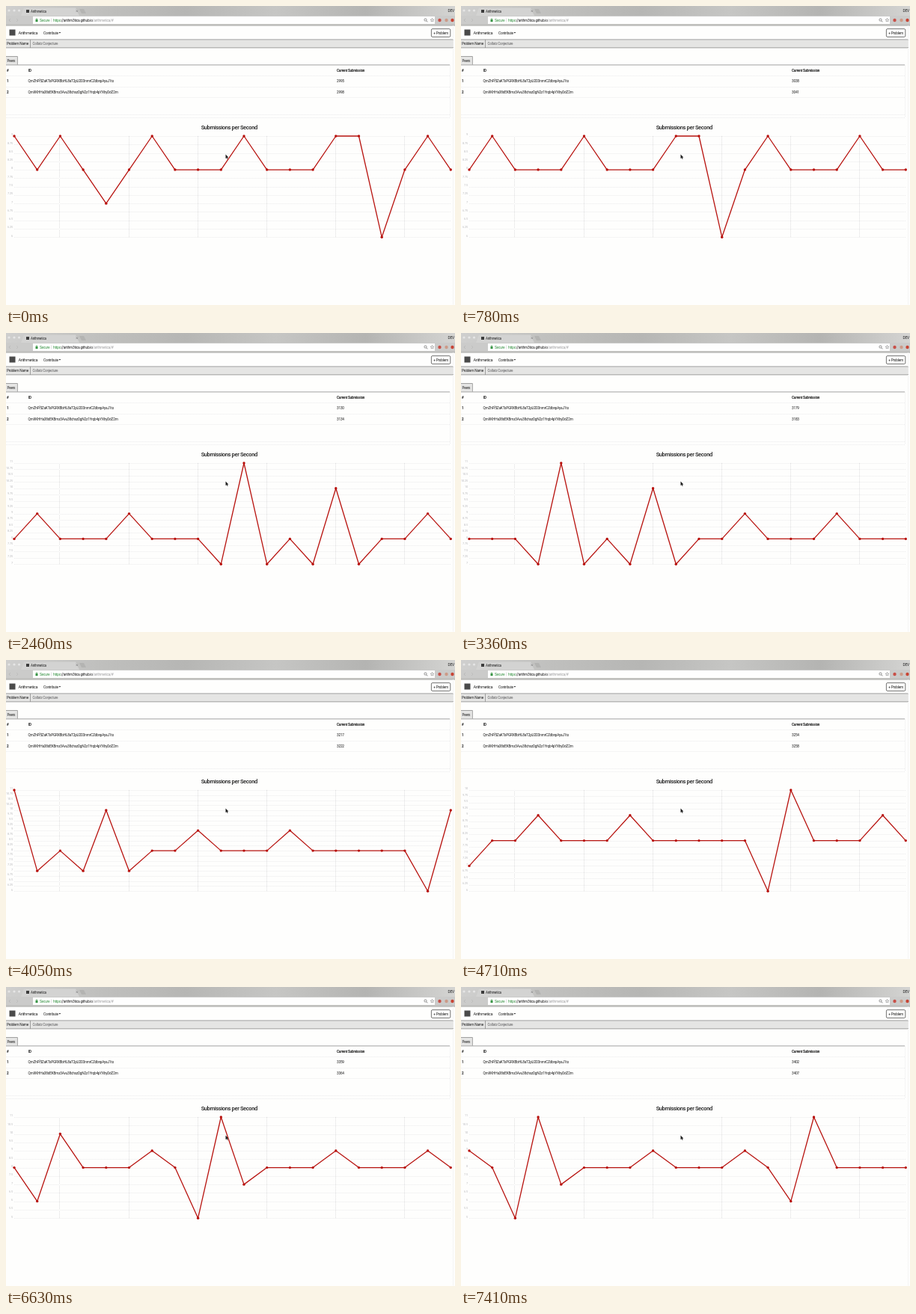
These frames come from a looping animation (600x400 px, 7440 ms). An HTML page with a canvas:

```html
<!DOCTYPE html>
<html lang="en">
<head>
<meta charset="utf-8">
<title>Arithmetica</title>
<style>
  html, body { margin: 0; width: 100%; height: 100%; overflow: hidden; background: #fefefd; }
  canvas { display: block; width: 600px; height: 400px; }
</style>
</head>
<body>
<canvas id="stage" width="600" height="400"></canvas>
<script>
const ctx = document.getElementById('stage').getContext('2d');
const LOOP = 7440, TICK = 30, SHIFT = 150, LEAD = 90;
const FONT = 'Roboto, "Liberation Sans", sans-serif';
const INK = '#1c1c1c', GREY = '#e5e5e4', RULE = '#8c8c8c', FAINT = '#ebebec';

const PEERS = [
  { id: 'QmZhFf5ZaKTsPGRXBbHL8aT2pU2D3nmrCZdbnpAyaJ1ts', from: 2995, perSecond: 54.9 },
  { id: 'QmXKHHa38dEKBmz3Avu38chszDgN2z1Yrqb4pYXhyDdZ2m', from: 2998, perSecond: 55.2 }
];
const PLOT = { left: 11, right: 594.3, top: 174, bottom: 309.2 };

// Submissions per second hover around BASE; the chart shows a window of COUNT.
const BASE = 8, COUNT = 20;
// Stalls and the bursts that follow them, keyed by their first second.
const STALLS = {
  0: [1], 4: [-1], 15: [1, -2], 26: [-1, 3, -1], 30: [-1, 2, -1],
  45: [-2, 2], 52: [-3, 3, -1], 64: [-2, 3, 0]
};

// One extra submission every fourth second, a second late for a while.
function rate(i) {
  for (const back of [0, 1, 2]) {
    const value = STALLS[i - back]?.[back];
    if (value !== undefined) return value;
  }
  const late = i > 25 && i < 43;
  return i % 4 === (late ? 3 : 2) ? 1 : 0;
}

function rect(x, y, w, h, fill) {
  ctx.fillStyle = fill;
  ctx.fillRect(x, y, w, h);
}

function disc(x, y, r, fill) {
  ctx.fillStyle = fill;
  ctx.beginPath();
  ctx.arc(x, y, r, 0, Math.PI * 2);
  ctx.fill();
}

function path(points, color, width = 1) {
  ctx.strokeStyle = color;
  ctx.lineWidth = width;
  ctx.beginPath();
  points.forEach(([x, y]) => ctx.lineTo(x, y));
  ctx.stroke();
}

function shape(points, fill) {
  ctx.fillStyle = fill;
  ctx.beginPath();
  points.forEach(([x, y]) => ctx.lineTo(x, y));
  ctx.fill();
}

function dashed(points, color = FAINT) {
  ctx.setLineDash([1, 1]);
  path(points, color);
  ctx.setLineDash([]);
}

function roundBox(x, y, w, h, r, color) {
  ctx.strokeStyle = color;
  ctx.lineWidth = 0.8;
  ctx.beginPath();
  ctx.roundRect(x, y, w, h, r);
  ctx.stroke();
}

// Returns the x where the text ends.
function text(str, x, y, size, { color = INK, weight = 400, align = 'left' } = {}) {
  ctx.font = `${weight} ${size}px ${FONT}`;
  ctx.letterSpacing = `${-0.05 * size}px`;
  ctx.fillStyle = color;
  ctx.textAlign = align;
  ctx.fillText(str, x, y);
  return x + ctx.measureText(str).width;
}

function drawBrowser() {
  const bar = ctx.createLinearGradient(0, 0, 600, 0);
  ['#cfcfce', '#c0c0be', '#b6b6b4', '#c6c6c4', '#b4b4b2', '#d4d4d2']
    .forEach((color, i, all) => bar.addColorStop(i / (all.length - 1), color));
  rect(0, 0, 600, 13, bar);
  [4, 11, 17.5].forEach(x => disc(x, 6, 1.6, '#e6e6e6'));

  shape([[20, 13], [24, 2.5], [93, 2.5], [98, 13]], '#d3d3d2');
  shape([[98, 4], [104, 4], [107, 10], [101, 10]], '#b4b4b2');
  rect(27, 5, 4, 4, '#3c3c3c');
  text('Arithmetica', 33, 8.8, 4.5);
  path([[93.5, 5.5], [96, 8]], '#77777a', 0.6);
  path([[96, 5.5], [93.5, 8]], '#77777a', 0.6);
  text('DEV', 590.5, 7.8, 4.8);

  rect(0, 13, 600, 13.5, '#cbcbca');
  rect(36, 14, 537, 10, '#fefefe');
  path([[6, 17], [4, 19], [6, 21]], '#b2b2b2', 0.7);
  path([[14, 17], [16, 19], [14, 21]], '#b8b8b8', 0.7);

  const green = { color: '#2f8f3c' };
  rect(39.5, 18.5, 3, 2.6, green.color);
  roundBox(40.2, 17, 1.6, 2, 0.6, green.color);
  text('Secure', 45, 20.8, 4.8, green);
  rect(60.5, 16.5, 0.6, 5, '#c8c8c8');
  let x = text('https', 63, 20.8, 4.8, green);
  x = text('://arithm3tica.github.io', x, 20.8, 4.8);
  text('/arithmetica/#', x, 20.8, 4.8, { color: '#a0a0a2' });

  ctx.strokeStyle = '#606060';
  ctx.lineWidth = 0.7;
  ctx.beginPath();
  ctx.arc(560.5, 18.5, 1.6, 0, 7);
  ctx.stroke();
  path([[561.8, 19.8], [563.3, 21.3]], '#606060', 0.8);
  const star = Array.from({ length: 11 }, (_, i) => {
    const a = -Math.PI / 2 + i * Math.PI / 5, r = i % 2 ? 1.1 : 2.5;
    return [569.5 + r * Math.cos(a), 19 + r * Math.sin(a)];
  });
  path(star, '#707070', 0.5);
  disc(579.5, 19, 2.2, '#c85048');
  disc(588.5, 19, 2.2, '#cc9a88');
  disc(596.5, 19, 2.2, '#c84434');
  rect(0, 24.5, 600, 2, '#bcbcba');
}

function drawPage() {
  rect(4.5, 31.5, 8, 8, '#4a4a4a');
  text('Arithmetica', 16.5, 37.8, 5.6);
  text('Contribute', 50, 37.5, 4.8);
  shape([[70.6, 35], [73.2, 35], [71.9, 36.6]], INK);
  roundBox(568.4, 30.6, 25.4, 10.8, 1.5, '#505050');
  text('+ Problem', 581.1, 37.6, 4.8, { align: 'center' });

  rect(0, 45, 598, 11, GREY);
  rect(0, 44.5, 598, 0.8, RULE);
  rect(0, 55.5, 598, 0.8, RULE);
  rect(32, 45, 0.8, 11, RULE);
  text('Problem Name', 1, 52.2, 4.8);
  text('Collatz Conjecture', 35.5, 52.2, 4.7, { color: '#606062' });

  rect(0, 67.5, 15, 11, GREY);
  path([[0, 67.5], [15.4, 67.5], [15.4, 78.5]], RULE, 0.8);
  text('Peers', 1.5, 74.9, 4.7);
  rect(0, 78.5, 593, 0.8, RULE);

  [93.5, 108.5, 122.5, 145.5, 149.5].forEach(y => dashed([[0, y], [593, y]]));
  dashed([[593.5, 79], [593.5, 149]]);
  dashed([[597.5, 26], [597.5, 400]]);
}

function drawTable(t) {
  const bold = { weight: 700 };
  text('#', 1, 88.2, 4.6, bold);
  text('ID', 30, 88.2, 4.6, bold);
  text('Current Submission', 442, 88.2, 4.65, bold);
  PEERS.forEach(({ id, from, perSecond }, i) => {
    const y = 102.2 + i * 14.4;
    text(i + 1, 1, y, 4.6, bold);
    text(id, 29.5, y, 4.8);
    text(Math.round(from + perSecond * t / 1000), 442, y, 4.8);
  });
}

function drawChart(t) {
  const start = Math.floor((t + LEAD) / SHIFT);
  const rates = Array.from({ length: COUNT }, (_, i) => rate(start + i));
  const low = Math.min(...rates), high = Math.max(...rates);
  const unit = (PLOT.bottom - PLOT.top) / (high - low);
  const stepX = (PLOT.right - PLOT.left) / (COUNT - 1);
  const toX = i => PLOT.left + i * stepX;
  const toY = v => PLOT.bottom - (v - low) * unit;

  text('Submissions per Second', 298.3, 164.6, 7.55, { align: 'center', weight: 500 });

  for (let i = 2; i < COUNT; i += 3) {
    const x = Math.round(toX(i)) - 0.5;
    dashed([[x, PLOT.top], [x, PLOT.bottom]], '#dededf');
  }
  const step = unit / 4 > 6.2 ? 0.25 : 0.5;
  for (let v = low; v <= high; v += step) {
    const y = toY(v), lineY = Math.round(y) + 0.5;
    dashed([[PLOT.left, lineY], [PLOT.right, lineY]]);
    text(BASE + v, 9, y - 0.6, 4, { color: '#bcbcbe', align: 'right' });
  }

  const points = rates.map((v, i) => [toX(i), toY(v)]);
  ctx.lineJoin = 'round';
  path(points, '#b81410', 1.3);
  points.forEach(([x, y]) => disc(x, y, 1.7, '#b8100c'));
}

function drawPointer() {
  shape([[293.5, 198.5], [293.5, 204.2], [294.8, 203], [295.7, 205],
         [296.5, 204.6], [295.7, 202.7], [297.3, 202.6]], INK);
}

function frame(now) {
  const t = Math.floor((now % LOOP) / TICK) * TICK;
  rect(0, 0, 600, 400, '#fefefd');
  drawBrowser();
  drawPage();
  drawTable(t);
  drawChart(t);
  drawPointer();
}

let origin = null;
function loop(now) {
  origin ??= now;
  frame(now - origin);
  requestAnimationFrame(loop);
}
frame(0);
requestAnimationFrame(loop);
</script>
</body>
</html>
```
